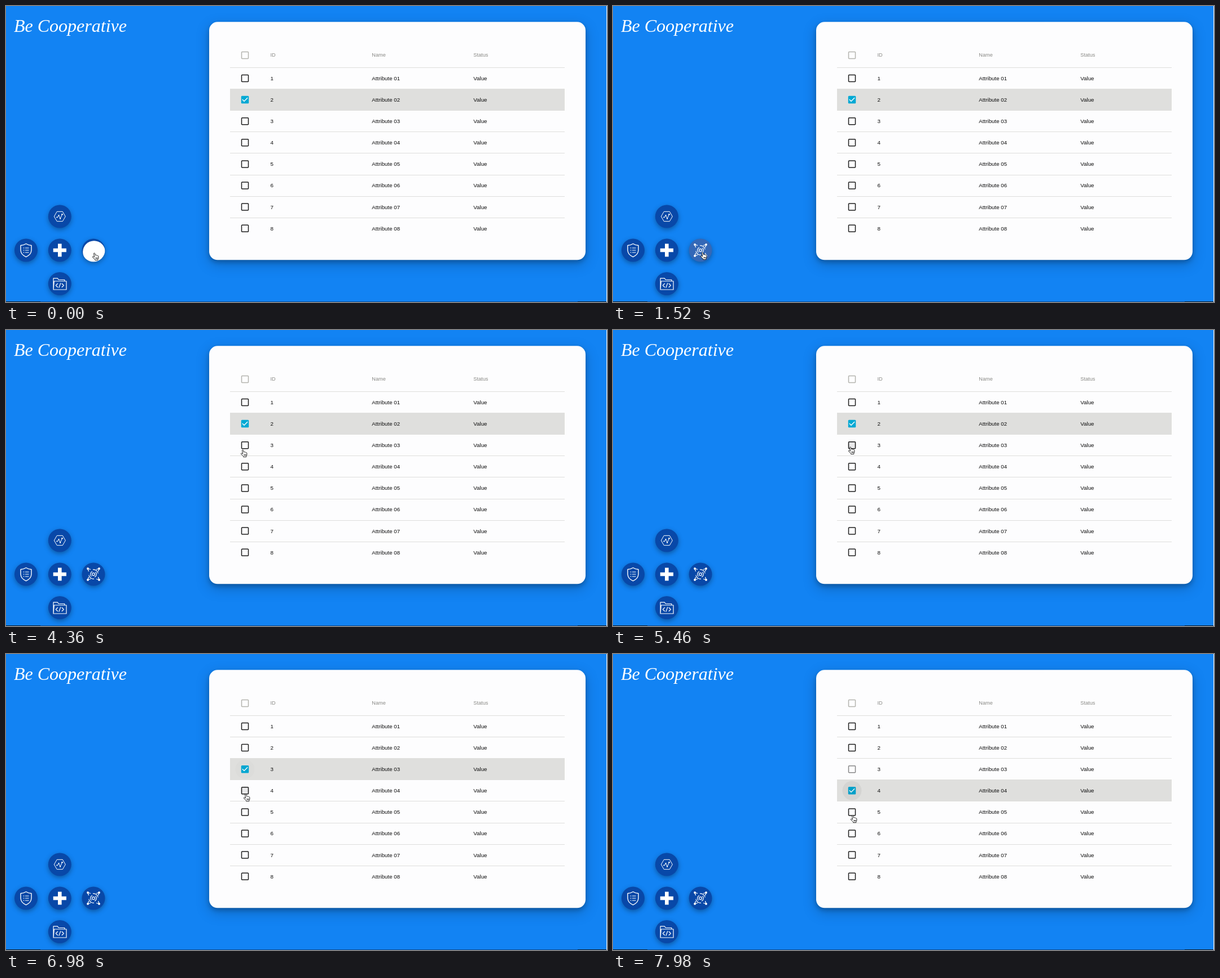
These frames come from a looping animation (1065x526 px, 8 s). An HTML page:

```html
<!DOCTYPE html>
<html lang="en">
<head>
<meta charset="utf-8">
<title>Attribute table</title>
<style>
  html, body { margin: 0; width: 100%; height: 100%; overflow: hidden; background: #1283f3; }
  svg { display: block; width: 1065px; height: 526px; font: 9.75px "Liberation Sans", Arial, sans-serif; }
  .card { fill: #fdfdfe; filter: drop-shadow(0 4.5px 4px rgba(0,0,0,.23)) drop-shadow(0 7.5px 11px rgba(0,0,0,.2)); }
  .disc { fill: #0848a8; filter: drop-shadow(0 3px 4px rgba(0,0,0,.33)); }
  .icon { fill: none; stroke: #fff; stroke-width: 1.2; stroke-linejoin: round; }
  .icon .solid { fill: #fff; stroke: none; }
  .brand { font: italic 32px "Liberation Serif", "Times New Roman", serif; fill: #fff; }
  .head { font-size: 9.2px; fill: #888884; }
  .box { fill: none; stroke: #1c1c1c; stroke-width: 1.5; }
</style>
</head>
<body>
<svg viewBox="0 0 1065 526">
  <defs><clipPath id="round"><circle cx="155" cy="434" r="20.5"/></clipPath></defs>
  <rect width="1065" height="526" fill="#1283f3"/>
  <rect y="525" width="1065" height="1" fill="#0a4a90"/>
  <path d="M0 525.5H61M1013 525.5H1064" stroke="#0b1622"/>
  <rect x="1064" width="1" height="526" fill="#f4f8fc"/>
  <text class="brand" x="14" y="46">Be Cooperative</text>

  <rect class="card" x="360" y="28.3" width="667" height="423" rx="15"/>
  <g class="head">
    <rect class="box" x="417.5" y="81.5" width="12" height="12" rx="1" style="stroke:#b4b4ae"/>
    <text x="468.5" y="90">ID</text><text x="648.3" y="90">Name</text><text x="828.3" y="90">Status</text>
  </g>
  <g id="rows"></g>

  <g class="icon" transform="translate(95.3 374)">
    <circle class="disc" r="20.5" stroke="none"/>
    <path d="M-10 0L-5-8.7H5L10 0L5 8.7H-5Z" stroke-width="1"/>
    <path d="M-5.5 1.5H-4L-1.8-2L.8 4L4-3.5" stroke-width="1"/>
    <g class="solid"><circle cx="-5" cy="1.5" r="1.1"/><circle cx="-1.8" cy="-2" r="1.1"/><circle cx=".8" cy="4" r="1.1"/><circle cx="4.2" cy="-3.7" r="1.3"/></g>
  </g>

  <g class="icon" transform="translate(35.5 434)">
    <circle class="disc" r="20.5" stroke="none"/>
    <path d="M0-11.5Q5-8.5 9.5-8.5V0Q9 8 0 11.8Q-9 8-9.5 0V-8.5Q-5-8.5 0-11.5Z" stroke-width="1.4"/>
    <path d="M-5-4h2M-1.5-4H5M-5 0h2M-1.5 0H5M-5 4h2M-1.5 4H5"/>
  </g>

  <g class="icon" transform="translate(95.3 434)">
    <circle class="disc" r="20.5" stroke="none"/>
    <path d="M-11.6 0H11.6M0-11.6V11.6" stroke-width="6.6"/>
  </g>

  <g class="icon" transform="translate(95.3 493.5)">
    <circle class="disc" r="20.5" stroke="none"/>
    <path d="M-11.3 10.5V-9.7H-4L-2-7H8.5V-4.5M-11.3 10.5L-10-4.5H11.7V10.5Z"/>
    <path d="M-3.5-.5L-7 3L-3.5 6.5M3.5-.5L7 3L3.5 6.5M1.6-1.2L-1.6 7.2"/>
  </g>

  <g class="icon" transform="translate(155 434)">
    <circle class="disc" r="20.5" stroke="none"/>
    <circle r="2.4"/>
    <path d="M-2-5A5.4 5.4 0 0 0-3.6 4M2 5A5.4 5.4 0 0 0 3.6-4M-1-8.4A8.4 8.4 0 0 1 8.2-1.5M1 8.4A8.4 8.4 0 0 1-8.2 1.5"/>
    <g id="node"><path d="M-8.5-5L-10-10L-5-8.5"/><circle class="solid" cx="-10" cy="-10" r="1.9"/></g>
    <use href="#node" transform="rotate(90)"/><use href="#node" transform="rotate(180)"/><use href="#node" transform="rotate(270)"/>
  </g>
  <g clip-path="url(#round)"><circle id="flash" cx="156" cy="437" fill="#fff"/></g>

  <path id="hand" d="M2.4 1.6Q3.4 .1 4.5 1.5L5.4 5Q6.4 4 7.4 5.1Q8.6 4.4 9.3 5.8Q10.7 5.6 10.9 7.2L10.8 10.3L9.8 12V13.6H4.6V12.3L1 9Q-.3 7.2 1.1 6.8Q2.4 7 3.7 8.2ZM6 9V11.4M7.6 9V11.4M9.1 9V11.4" fill="#fff" stroke="#111" stroke-width=".9" stroke-linejoin="round"/>
</svg>
<script>
const LOOP = 8000, PITCH = 38.1;
// When each selectable row is pressed, switched on and switched off.
const picks = {
  2: { press: -9e3, on: -8e3, off: 6040 },
  3: { press: 5360, on: 6040, off: 7560 },
  4: { press: 6880, on: 7560, off: 9e4 }
};
// Pointer stops: time, x, y.
const stops = [
  [0, 153, 438], [600, 155, 437], [1520, 155, 437], [2640, 156, 437], [2900, 156, 437],
  [4100, 416, 212], [4360, 416, 212], [5000, 417, 207], [6100, 417, 207],
  [6800, 421, 248], [7600, 421, 248], [7900, 421, 286], [LOOP, 421, 286]
];
const $ = id => document.getElementById(id);
const clamp = k => Math.min(1, Math.max(0, k));
const easeOut = k => 1 - (1 - clamp(k)) ** 3;
const smooth = k => k * k * (3 - 2 * k);

function rowMarkup(n) {
  const y = 128.5 + (n - 1) * PITCH, top = Math.floor(y - 19), base = Math.round(y + 3.4);
  return `<rect x="397" y="${top}" width="593" height="1" fill="#dededc"/>
    <rect id="fill${n}" x="397" y="${top}" width="593" height="39" fill="#dfdfdd" opacity="0"/>
    <g transform="translate(423.5 ${y})">
      <rect id="box${n}" class="box" x="-6" y="-6" width="12" height="12" rx="1"/>
      <g id="tick${n}" opacity="0">
        <rect x="-6.75" y="-6.75" width="13.5" height="13.5" rx="1.5" fill="#00a9d4"/>
        <path d="M-4.7-.5L-1.5 2.7L4.7-3.5" fill="none" stroke="#fff" stroke-width="1.4"/>
      </g>
      <circle id="ripple${n}" r="0"/>
    </g>
    <g fill="#0c0c0c"><text x="468.5" y="${base}">${n}</text>
    <text x="648.3" y="${base}">Attribute 0${n}</text><text x="828.3" y="${base}">Value</text></g>`;
}
$("rows").innerHTML = [1, 2, 3, 4, 5, 6, 7, 8].map(rowMarkup).join("");

const set = (id, attrs) => {
  for (const key in attrs) $(id).setAttribute(key, attrs[key]);
};

function drawRow(n, t) {
  const { press, on, off } = picks[n];
  const active = t >= on && t < off;
  const grown = easeOut((t - on) / 450);
  set("fill" + n, { opacity: +active });
  set("tick" + n, {
    opacity: t < on ? 0 : active ? 1 : 1 - easeOut((t - off) / 450),
    transform: `scale(${grown})`
  });
  set("box" + n, { opacity: t < on ? 1 : active ? 1 - grown : easeOut((t - off - 200) / 1000) });
  set("ripple" + n, {
    r: 17 * easeOut((t - press) / 600),
    opacity: .08 * (1 - clamp((t - on) / 1200))
  });
}

function pointer(t) {
  const i = stops.findIndex(s => s[0] > t);
  const [t0, x0, y0] = stops[i - 1], [t1, x1, y1] = stops[i];
  const k = smooth((t - t0) / (t1 - t0));
  return [x0 + (x1 - x0) * k, y0 + (y1 - y0) * k];
}

function draw(now) {
  const t = Math.max(0, now) % LOOP;
  for (const n in picks) drawRow(n, t);
  set("flash", {
    r: 19.7 + 15 * easeOut(t / 300),
    opacity: (1 - clamp((t - 300) / 2100)) ** 2
  });
  set("hand", { transform: `translate(${pointer(t)})` });
}

const start = performance.now();
function tick() {
  draw(performance.now() - start);
  requestAnimationFrame(tick);
}
tick();
</script>
</body>
</html>
```
